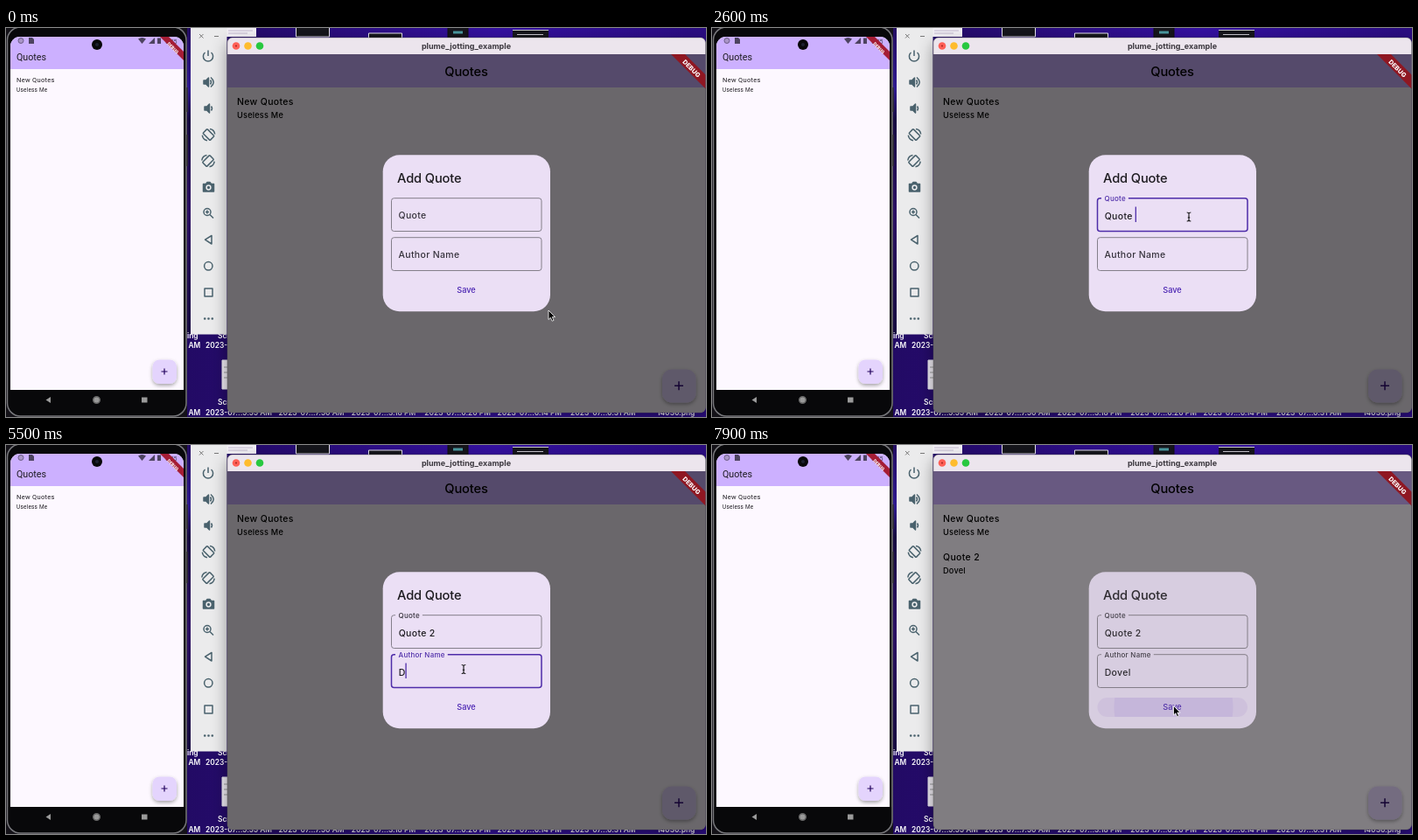
An HTML page that plays this animation: 800x445 px, repeating every 8000 ms.

```html
<!DOCTYPE html>
<html lang="en">
<head>
<meta charset="utf-8">
<title>Add quote</title>
<style>
html, body { margin: 0; width: 100%; height: 100%; overflow: hidden; background: #1c0b55; }
svg { display: block; width: 800px; height: 445px; }
text { white-space: pre; font-family: Inter, "Open Sans", sans-serif; }
.roboto text { font-family: Roboto, "Noto Sans", sans-serif; }
.mid { text-anchor: middle; }
.title { font-size: 14.7px; font-weight: 500; letter-spacing: -.15px; }
.item { font-size: 10.5px; font-weight: 500; letter-spacing: .33px; }
.sub { font-size: 9.2px; font-weight: 500; letter-spacing: .2px; }
.files text { font-size: 8.4px; font-weight: 600; fill: #fff; }
.icons { fill: none; stroke: #4a626d; stroke-width: 1.5; stroke-linejoin: round; }
.icons .solid { fill: #4a626d; }
.box { fill: none; }
</style>
</head>
<body>
<svg viewBox="0 0 800 445">
  <defs>
    <linearGradient id="desk" x2="1" y2="0">
      <stop offset="0" stop-color="#1b0b50"/><stop offset=".35" stop-color="#250a6c"/>
      <stop offset=".7" stop-color="#3410a0"/><stop offset="1" stop-color="#2a0c80"/>
    </linearGradient>
    <linearGradient id="strip" x2="0" y2="1">
      <stop offset="0" stop-color="#240b62"/><stop offset=".2" stop-color="#2f1a90"/>
      <stop offset=".3" stop-color="#170a40"/><stop offset=".6" stop-color="#2c1064"/>
      <stop offset="1" stop-color="#170a40"/>
    </linearGradient>
    <clipPath id="screen"><rect x="5" y="10" width="198" height="405"/></clipPath>
    <clipPath id="window"><rect x="253" y="11" width="546.5" height="429" rx="6"/></clipPath>
    <clipPath id="pill"><rect x="440.5" y="289" width="171.5" height="22" rx="11"/></clipPath>
    <filter id="shadow" x="-30%" y="-30%" width="160%" height="170%">
      <feDropShadow dx="0" dy="2" stdDeviation="2" flood-opacity=".35"/>
    </filter>
    <filter id="lift"><feDropShadow dx="0" dy="6" stdDeviation="9" flood-opacity=".4"/></filter>
  </defs>

  <!-- desktop -->
  <rect width="800" height="445" fill="url(#desk)"/>
  <rect x="205" width="7" height="350" fill="url(#strip)"/>
  <g stroke="#e8e6ee" fill="#15151b">
    <path d="M252 0h34v10h-34z" fill="#f4f1f7" stroke="none"/>
    <path d="M254 3h28M254 6h22" stroke="#c3b9cf"/>
    <path d="M331.5-1h38v11h-38zM414.5 6h38v8h-38z"/>
    <path d="M579 2h41v10h-41z" stroke="none"/><path d="M579 2.500h41M584 7.500h30" stroke="#c9c7cf"/>
    <path d="M505-1h23v14h-23z" stroke="#111"/>
    <path d="M511 5h11" stroke="#4a9aa0" stroke-width="3"/>
    <path d="M247 380h8v33h-8z" fill="#eeeaf2"/>
    <path d="M249 388h5M249 394h5M249 400h5" stroke="#999"/>
  </g>
  <g class="files" id="files">
    <text x="207" y="355">ing</text><text x="242" y="355">Screen</text>
    <text x="208.500" y="366">AM</text><text x="228" y="366">2023-07</text>
    <text x="242" y="431">Screen</text><text x="208.500" y="442.500">AM</text>
    <text x="744" y="442.500">14036.png</text>
  </g>

  <!-- phone -->
  <g class="roboto">
    <rect x="0" y="-1" width="207" height="446" fill="#141218"/>
    <rect x="1.500" y="-1" width="204.500" height="445" rx="15" fill="#08080a" stroke="#77777b" stroke-width="1.500"/>
    <path d="M207 68v28M207 122v36" stroke="#333" stroke-width="1.500"/>
    <g clip-path="url(#screen)">
      <rect x="5" y="10" width="198" height="430" rx="11" fill="#fdf8ff"/>
      <path d="M5 47V21a11 11 0 0 1 11-11h176a11 11 0 0 1 11 11v26z" fill="#ccb0ff"/>
      <rect x="5" y="414" width="198" height="2" fill="#08080a"/>
      <circle cx="17" cy="14.500" r="3" fill="#a995c7" stroke="#6d5d88"/>
      <path d="M26 11h4l2 2v5h-6z" fill="#4d4360"/>
      <path d="M151 12.500q4.500-3 9 0l-4.500 5.500zM163 18h7v-7zM173 11.500h4v6.500h-4z" fill="#4d4360"/>
      <text x="182" y="17.500" font-size="7" fill="#4d4360">5:55</text>
      <path d="M176 10h10l17 17v10z" fill="#a51d35"/>
      <text class="mid" transform="translate(190.300 23.300) rotate(45)" y="1" font-size="5" font-weight="800" fill="#fff">DEBUG</text>
    </g>
    <circle cx="104" cy="19" r="6" fill="#08080a"/>
    <circle cx="104" cy="19" r="2" fill="#1d2030"/>
    <g fill="#1d1b20">
      <text x="12" y="37" font-size="10.700">Quotes</text>
      <text x="12" y="62" font-size="7.500" letter-spacing=".3">New Quotes</text>
      <text x="12" y="72.500" font-size="6.400" letter-spacing=".25">Useless Me</text>
    </g>
    <rect x="167.500" y="379.500" width="27.500" height="27.500" rx="8" fill="#e4d4fd" filter="url(#shadow)"/>
    <path d="M177.500 393h7M181 389.500v7" stroke="#21005d" stroke-width="1.200"/>
    <g fill="#9a9a9a">
      <path d="M51 422v7l-5.500-3.500z"/><circle cx="103.500" cy="425.500" r="3.800" stroke="#666" stroke-width="1.500"/><path d="M155 422.500h6.500v6H155z"/>
    </g>
  </g>

  <!-- emulator toolbar -->
  <rect x="211" y="-4" width="41.500" height="354.500" fill="#ebebec"/>
  <rect x="253" y="11" width="546.500" height="429" rx="6" filter="url(#lift)"/>
  <g class="icons">
    <path d="M221 7l4.500 4.500m0-4.500l-4.500 4.500M238 9.500h5" stroke="#777" stroke-width="1"/>
    <path d="M227.500 28a5.600 5.600 0 1 0 7 0M231 25.500v6.500"/>
    <path class="solid" d="M226 60v4h2.500l3 3V57l-3 3z"/><path d="M233.500 59.500q2 2.500 0 5M234 56.500q6.500 5.500 0 11"/>
    <path class="solid" d="M227 90v4h2.500l3 3V87l-3 3z"/><path d="M234.500 89.500q2 2.500 0 5"/>
    <g id="turn">
      <rect x="-5.800" y="-3.500" width="11.600" height="7" rx="1" transform="translate(231.500 122) rotate(45)"/>
      <path d="M233 115.500q5 .8 5.700 6M230 128.700q-5-.8-5.700-6"/>
    </g>
    <use href="#turn" transform="matrix(-1 0 0 1 462.500 30)"/>
    <path class="solid" d="M225.500 178.500h3l1.500-2h3l1.500 2h3v8.500h-12z"/><circle cx="231.500" cy="182.500" r="2.400" stroke="#ebebed"/>
    <circle cx="230" cy="210.500" r="4"/><path d="M233 213.500l4 4M228 210.500h4M230 208.500v4"/>
    <path d="M235 237.500v9.500l-7.500-4.800z"/>
    <circle cx="231.300" cy="272.300" r="4.700"/>
    <path d="M227 298h9v9h-9z"/>
    <path d="M227.200 332.500h.01M231.500 332.500h.01M235.800 332.500h.01" stroke-width="2.700" stroke-linecap="round"/>
  </g>

  <!-- desktop app -->
  <g clip-path="url(#window)">
    <rect x="253" y="11" width="547" height="429" fill="#fdf7ff"/>
    <rect x="253" y="29" width="547" height="39" fill="#ccb0ff"/>
    <text class="title mid" x="526" y="55">Quotes</text>
    <text class="item" x="264" y="88">New Quotes</text>
    <text class="sub" x="264" y="102.500">Useless Me</text>
    <g id="added"><text class="item" x="264" y="132">Quote 2</text><text class="sub" x="264" y="146.500">Dovel</text></g>
    <rect x="750" y="390.500" width="38.500" height="38" rx="11" fill="#e4d4fd" filter="url(#shadow)"/>
    <rect id="scrim" x="253" y="29" width="547" height="411"/>
    <path d="M764 409.300h10M769 404.300v10" stroke="#150433" stroke-width="1.500"/>
    <path d="M760 30h16l24 24v16z" fill="#8f1722"/>
    <text class="mid" transform="translate(783.300 46.500) rotate(45)" y="2.300" font-size="7.200" font-weight="800" fill="#fff">DEBUG</text>
    <rect x="253" y="11" width="547" height="19" fill="#ece5ed"/>
    <circle cx="263" cy="20.500" r="4.300" fill="#ff5f57"/><circle cx="263" cy="20.500" r="1.100" fill="#a82a22"/>
    <circle cx="276.500" cy="20.500" r="4.300" fill="#febc2e"/><circle cx="290" cy="20.500" r="4.300" fill="#28c840"/>
    <text class="mid" x="526" y="23.500" font-size="9" font-weight="650" fill="#3c383f">plume_jotting_example</text>
  </g>
  <rect x="253" y="11" width="546.500" height="429" rx="6" fill="none" stroke="#555" stroke-opacity=".6" stroke-width=".7"/>

  <!-- dialog -->
  <g id="dialog">
    <rect x="430.700" y="145.200" width="191.300" height="179" rx="19" fill="#ebdff5"/>
    <text class="title" x="447" y="177" fill="#1d1b20">Add Quote</text>
    <g id="fields"></g>
    <g clip-path="url(#pill)" fill="#7448c8">
      <rect id="hover" x="440" y="289" width="172" height="22" fill-opacity=".09"/>
      <circle id="ripple" cx="527.500" cy="300" fill-opacity=".1"/>
    </g>
    <text class="mid" x="526" y="303" font-size="9.200" font-weight="550" fill="#4b25b3">Save</text>
  </g>

  <g id="pointer">
    <path id="arrow" d="M0 0v10.500l2.400-2.200 1.700 3.900 1.900-.8-1.700-3.800h3.300z" fill="#000" stroke="#fff" stroke-width=".8"/>
    <path id="beam" d="M-2.300-5q2 0 2.300 1.200Q.3-5 2.300-5M0-4v8M-2.300 5q2 0 2.300-1.200Q.3 5 2.300 5M-1.200.8h2.400" fill="none" stroke="#111" stroke-width="1.100"/>
    <path id="hand" transform="translate(0 1.500)" d="M-1 6V1q0-1.300 1-1.300T1 1v3q1.200-.8 1.900.2 1.200-.5 1.700.5 1.500-.3 1.500 1.100v2.400l-1 3.300h-5l-3.300-4.300q.6-1.700 2.200-.2z" fill="#fff" stroke="#111" stroke-width=".9"/>
  </g>
</svg>
<script>
const LOOP = 8000, STEP = 100, PRESS = 7700, CLOSE = 7900;
const PRIMARY = '#4e2da9', DIALOG = '#ebdff5';
const $ = id => document.getElementById(id);
const clamp = v => Math.max(0, Math.min(1, v));
const ease = v => { v = clamp(v); return v * v * (3 - 2 * v); };
const mix = (a, b, p) => a + (b - a) * p;

function add(parent, tag, attrs, text = '') {
  const node = document.createElementNS('http://www.w3.org/2000/svg', tag);
  set(node, attrs);
  node.textContent = text;
  return parent.appendChild(node);
}
function set(node, attrs) {
  for (const key in attrs) node.setAttribute(key, attrs[key]);
}
const show = (node, on) => node.style.display = on ? '' : 'none';

['5.55 AM', '7.50 AM', '3.18 PM', '6.26 PM', '6.14 PM', '6.31 AM'].forEach((time, i) =>
  add($('files'), 'text', { x: 228 + i * 83.4, y: 442.5 }, '2023-07...' + time));

// Each field: focus span and the time at which each letter is typed.
const fields = [
  { label: 'Quote', value: 'Quote 2', y: 195, focus: 700, blur: 4000, keys: [1500, 1700, 1900, 2100, 2300, 2500, 2800] },
  { label: 'Author Name', value: 'Dovel', y: 240, focus: 4000, blur: PRESS, keys: [5300, 5600, 5900, 6200, 6400] }
];
for (const f of fields) {
  const g = add($('fields'), 'g', {});
  f.box = add(g, 'rect', { class: 'box', x: 440.5, y: f.y - .3, width: 171.5, height: 37.8, rx: 3 });
  f.gap = add(g, 'rect', { x: 445, y: f.y - 2, height: 4, fill: DIALOG });
  f.tag = add(g, 'text', { class: 'item' }, f.label);
  f.text = add(g, 'text', { class: 'item', x: 448.7, y: f.y + 23.5, fill: '#1d1b20' });
  f.caret = add(g, 'rect', { y: f.y + 9.5, width: 1.3, height: 17.5, fill: PRIMARY });
}

function drawField(f, t) {
  const focused = t >= f.focus && t < f.blur;
  const p = ease((t - f.focus) / 170);
  const typed = f.keys.filter(k => k <= t);
  const value = f.value.slice(0, typed.length);
  const leaving = t >= f.blur && t < f.blur + 200;
  set(f.box, {
    stroke: focused ? PRIMARY : leaving ? '#39343f' : '#79747e',
    'stroke-width': focused ? 1.5 : .9
  });
  set(f.tag, {
    transform: `translate(448.500 ${f.y + mix(23.2, 3, p)}) scale(${mix(1, .762, p)})`,
    fill: focused ? PRIMARY : '#37333d'
  });
  set(f.gap, { width: p * (f.tag.getComputedTextLength() * .762 + 6.5) });
  f.text.textContent = value;
  const idle = t - Math.max(f.focus, ...typed);
  show(f.caret, focused && idle % 1000 < 500);
  set(f.caret, { x: 448.7 + (value ? f.text.getComputedTextLength() - .2 : 0) });
}

// Pointer stops: time, x, y
const path = [[0, 620, 323], [100, 620, 323], [600, 545, 216], [3200, 545, 216],
  [3800, 523, 256.5], [6800, 523, 256.5], [7400, 527.5, 298.5]];

function drawPointer(t) {
  const i = path.findLastIndex(s => s[0] <= t);
  const a = path[i], b = path[i + 1] || a;
  const p = ease((t - a[0]) / (b[0] - a[0] || 1));
  const x = mix(a[1], b[1], p), y = mix(a[2], b[2], p);
  const over = (top, bottom) => x > 440 && x < 612 && y > top && y < bottom;
  const open = t < CLOSE;
  const beam = open && (over(195, 233) || over(240, 278));
  const hover = over(289, 311);
  set($('pointer'), { transform: `translate(${x} ${y})` });
  show($('beam'), beam);
  show($('hand'), open && hover);
  show($('arrow'), !beam && !(open && hover));
  show($('hover'), hover);
}

function draw(now) {
  const t = Math.floor(now % LOOP / STEP) * STEP;
  const closing = t >= CLOSE;
  fields.forEach(f => drawField(f, t));
  drawPointer(t);
  show($('added'), closing);
  set($('scrim'), { opacity: closing ? .495 : .58 });
  set($('dialog'), { opacity: closing ? .82 : 1 });
  set($('ripple'), { r: t < PRESS ? 0 : mix(0, 34, (t - PRESS) / 100) });
}

const start = performance.now();
function tick() {
  draw(performance.now() - start);
  requestAnimationFrame(tick);
}
tick();
</script>
</body>
</html>
```
